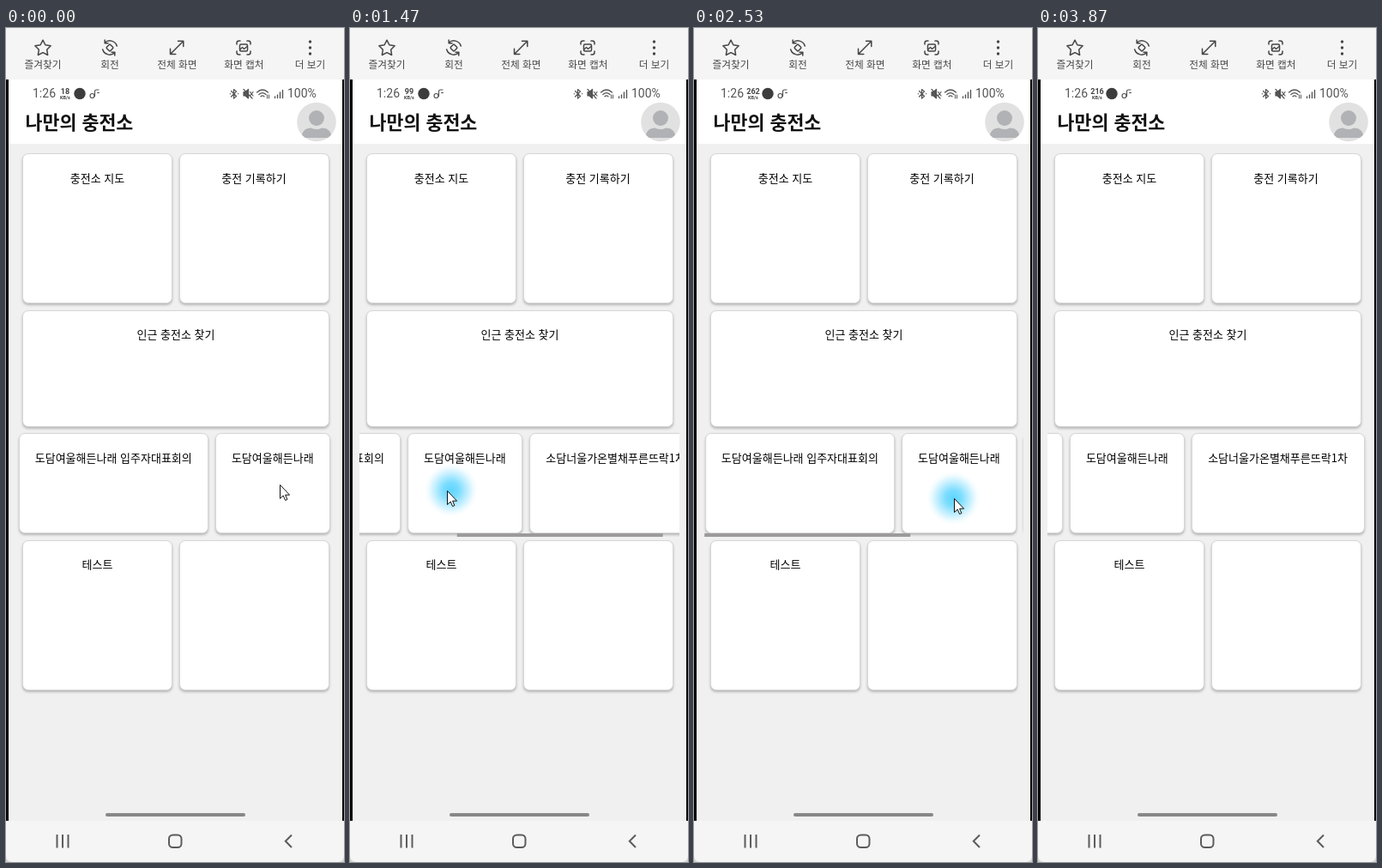
Write an HTML page that moves like this. It is 394 by 972 pixels and loops after 4.27 s.

```html
<!DOCTYPE html>
<html lang="ko">
<head>
<meta charset="utf-8">
<title>나만의 충전소</title>
<style>
html, body { margin: 0; width: 100%; height: 100%; overflow: hidden; background: #d4d4d4; }
#stage { position: relative; width: 394px; height: 972px; overflow: hidden;
  font-family: "Noto Sans CJK KR", "Noto Sans CJK", "Noto Sans", sans-serif; }
#stage > *, .card, .card span { position: absolute; }
.tools { left: 0; top: 0; width: 394px; height: 60px; background: #f5f5f5; }
.phone { left: 0; top: 60px; width: 394px; height: 864px; background: #000; }
.head { left: 3px; top: 60px; width: 389px; height: 75px; background: #fff; }
.body { left: 3px; top: 135px; width: 389px; height: 789px; background: #f0f0f0; }
.nav { left: 0; top: 924px; width: 394px; height: 48px; background: #f5f5f5; border-radius: 0 0 7px 7px; }
.card { box-sizing: border-box; background: #fff; border: 1px solid #d6d6d6; border-radius: 7px;
  box-shadow: 0 2px 3px rgba(0,0,0,.24); }
.card span { left: 0; right: 0; top: 17.5px; text-align: center; white-space: nowrap;
  font-size: 13px; line-height: 20px; font-weight: 500; color: #000; }
#row { left: 11px; top: 470px; width: 373px; height: 123px; overflow: hidden; }
#strip { position: absolute; left: -11px; top: -470px; width: 600px; height: 600px; }
#bar { position: absolute; left: 0; top: 118.5px; width: 240px; height: 4px; background: #9c9a9a; }
#glow { left: -31px; top: -31px; width: 62px; height: 62px;
  background: radial-gradient(circle closest-side, rgba(78,208,255,.9), rgba(90,212,255,.8) 30%,
    rgba(110,217,255,.42) 62%, rgba(130,222,255,.1) 86%, rgba(130,222,255,0)); }
svg { left: 0; top: 0; overflow: visible; }
.ui { fill: none; stroke: #444; stroke-width: 1.5; stroke-linecap: round; stroke-linejoin: round; }
.st { fill: none; stroke: #555; stroke-width: 1.2; stroke-linecap: round; stroke-linejoin: round; }
.rb { font-family: Roboto, sans-serif; }
</style>
</head>
<body>
<div id="stage">
  <div class="tools"></div>
  <div class="phone"></div>
  <div class="head"></div>
  <div class="body"></div>
  <div class="nav"></div>

  <svg width="394" height="972">
    <g class="ui">
      <path id="star"/>
      <path d="M115 17.5A8.5 8.5 0 0 1 129.3 21M127 28.5A8.5 8.5 0 0 1 112.7 25M115.2 14V17.7H119M126.8 32V28.3H123"/>
      <rect x="118" y="20" width="6" height="6" rx="1" transform="rotate(45 121 23)"/>
      <path d="M192 30L206.500 15.500M200.500 15.200H206.800V21.500M191.500 24.200V30.500H197.800"/>
      <path d="M269 19V17.500Q269 15 271.500 15H273M281 15H282.500Q285 15 285 17.500V19M285 27V28.500Q285 31 282.500 31H281M273 31H271.500Q269 31 269 28.500V27"/>
      <rect x="272.500" y="19" width="9" height="8" rx="1.500"/>
      <path d="M273 25L275.500 22.500L277.500 24.500L281 21.500" stroke-width="1.200"/>
    </g>
    <g fill="#444">
      <circle cx="354.500" cy="16" r="1.700"/><circle cx="354.500" cy="23" r="1.700"/><circle cx="354.500" cy="30" r="1.700"/>
    </g>
    <g font-size="11.700" fill="#484848" text-anchor="middle">
      <text x="43" y="47">즐겨찾기</text><text x="121" y="47">회전</text><text x="199.500" y="47">전체 화면</text>
      <text x="277.500" y="47">화면 캡처</text><text x="354.500" y="47">더 보기</text>
    </g>

    <g class="rb" fill="#555">
      <text x="31" y="81" font-size="14">1:26</text>
      <text x="328" y="81" font-size="14">100%</text>
      <g font-weight="700" text-anchor="middle" fill="#444">
        <text id="rate" x="69" y="77" font-size="9">18</text>
        <text x="69" y="83" font-size="5.500">KB/s</text>
      </g>
    </g>
    <circle cx="86" cy="76.500" r="6.700" fill="#3c3c3c"/>
    <g class="st">
      <path d="M103.500 79.500V74Q103.500 72 105.500 72H108M106.500 75.500H108.500"/>
      <circle cx="100.500" cy="79" r="2.500"/>
      <path d="M262.500 73.500L268.500 79.500L265.500 82V71.500L268.500 74L262.500 80"/>
      <path d="M270.500 76.700H270.600M261.300 76.700H261.400"/>
      <path d="M277 74.500H279L282.500 71.500V82L279 79H277Z" fill="#555"/>
      <path d="M284.500 74.500L288 79M288 74.500L284.500 79M277 71.500L287 82"/>
      <path d="M292.500 75Q299 69 305.500 75M294.800 77.500Q299 73.800 303 77.500M297 79.800Q299 78 301 79.800"/>
      <path d="M304.500 78V82M306.500 78V82" stroke-width="1"/>
      <path d="M313.500 80V81.500M316.500 78V81.500M319.500 75V81.500M322.500 72.500V81.500" stroke-width="1.400"/>
    </g>

    <text x="22.500" y="117.500" font-size="21.700" font-weight="700" fill="#111">나만의 충전소</text>
    <clipPath id="face"><circle cx="362" cy="109.500" r="22.800"/></clipPath>
    <circle cx="362" cy="109.500" r="22.800" fill="#e1e1e1"/>
    <g fill="#b0b2b5" clip-path="url(#face)">
      <circle cx="362" cy="105" r="9"/>
      <path d="M344.500 128Q345 116.500 356 116.500Q362 119.500 368 116.500Q379 116.500 379.500 128Z"/>
    </g>

    <rect x="116" y="915" width="163" height="4" rx="2" fill="#878787"/>
    <g fill="none" stroke="#5c5c5c" stroke-width="2">
      <path d="M59.500 940V955.500M66 940V955.500M72.500 940V955.500"/>
      <rect x="190" y="940.500" width="14.500" height="14.500" rx="4.500"/>
      <path d="M333 940.500L325.800 947.800L333 955"/>
    </g>
  </svg>

  <div id="row"><div id="strip"></div><div id="bar"></div></div>
  <div id="glow"></div>
  <svg id="cursor" width="14" height="21">
    <path d="M.5 .5V16.500L4.200 13L6.600 18.500L8.900 17.500L6.600 12.200H11.600Z" fill="#fff" stroke="#111" stroke-width="1"/>
  </svg>
</div>

<script>
const $ = id => document.getElementById(id);
const stage = $('stage'), strip = $('strip'), row = $('row');

function card(x, y, w, h, label, parent) {
  const el = document.createElement('div');
  el.className = 'card';
  el.style.cssText = `left:${x}px;top:${y}px;width:${w}px;height:${h}px`;
  const text = document.createElement('span');
  text.textContent = label;
  el.append(text);
  parent ? parent.append(el) : stage.insertBefore(el, row);
  return el;
}

card(19, 146, 175, 175, '충전소 지도');
card(201.5, 146, 175, 175, '충전 기록하기');
card(19, 328.5, 358, 136, '인근 충전소 찾기');
card(19, 596.5, 175, 175, '테스트');
card(201.5, 596.5, 175, 175, '');
card(14.5, 472, 221.5, 117, '도담여울해든나래 입주자대표회의', strip);
const pressed = card(243.5, 472, 134.5, 117, '도담여울해든나래', strip);
card(385.5, 472, 202, 117, '소담너울가온별채푸른뜨락1차', strip);

$('star').setAttribute('d', 'M' + Array.from({ length: 10 }, (_, i) => {
  const r = i % 2 ? 4.9 : 9.6, a = (i * 36 - 90) * Math.PI / 180;
  return (43 + r * Math.cos(a)).toFixed(2) + ' ' + (23.7 + r * Math.sin(a)).toFixed(2);
}).join('L') + 'Z');

// Pointer path: time, x, y
const path = [
  [0, 319, 532], [70, 319, 533], [130, 319, 535], [200, 319, 535], [270, 319, 537], [330, 318, 539],
  [400, 318, 539], [600, 306, 537], [870, 277, 534], [1000, 229, 534], [1120, 188, 535], [1170, 175, 535],
  [1200, 168, 535], [1270, 152, 536], [1400, 124, 538], [1530, 104, 540], [1650, 96, 541], [1800, 96, 541],
  [1930, 108, 542], [2070, 145, 544], [2120, 175.5, 545], [2170, 230, 546], [2200, 250, 546],
  [2270, 279, 547], [2400, 300, 548], [2530, 303, 548], [2600, 303, 548], [2670, 277, 548],
  [2730, 235, 547], [2790, 198.5, 547], [2840, 188, 547], [2870, 183, 547], [3000, 148, 544],
  [3200, 112, 536], [3400, 97, 524], [3470, 96, 521], [3530, 98, 560], [3600, 108, 760], [3670, 120, 955]
];
const rates = [[3400, 216], [2400, 262], [1400, 99], [470, 23], [0, 18]];
const LOOP = 4270, LIMIT = 207, VIEW = 373, LIFT = 3470;

function pointer(t) {
  const i = path.findIndex(p => p[0] >= t);
  if (i < 0) return path[path.length - 1].slice(1);
  if (i === 0) return path[0].slice(1);
  const a = path[i - 1], b = path[i], k = (t - a[0]) / (b[0] - a[0]);
  return [a[1] + (b[1] - a[1]) * k, a[2] + (b[2] - a[2]) * k];
}

const clamp = (v, lo, hi) => Math.max(lo, Math.min(hi, v));
const tick = k => Math.round(k * 20 / 3) * 10;
const move = (el, x, y) => { el.style.transform = `translate(${x}px,${y}px)`; };

function snap(t) {
  let k = Math.ceil(t * 3 / 200);
  while (tick(k) > t) k--;
  return Math.min(tick(k), 3870);
}

function draw(t) {
  const [cx, cy] = pointer(t).map(Math.round);
  move($('cursor'), cx, cy);
  $('cursor').style.visibility = t < 3730 ? 'visible' : 'hidden';

  const touching = t >= 930 && t < 3730;
  move($('glow'), ...pointer(Math.min(t - 30, LIFT)));
  $('glow').style.visibility = touching ? 'visible' : 'hidden';

  // The list trails the finger slightly
  const scroll = t < 930 ? 0 : clamp(303 - pointer(Math.min(t - 80, LIFT))[0], 0, LIMIT);
  move(strip, -scroll, 0);
  move($('bar'), scroll * VIEW / (VIEW + LIMIT), 0);
  $('bar').style.opacity = t < 930 ? 0 : clamp(1 - (t - 3670) / 200, 0, 1);

  const press = clamp(Math.min((t - 930) / 140, (1400 - t) / 140), 0, 1);
  const tone = Math.round(255 - 30 * press);
  pressed.style.transform = `scale(${1 - .036 * press})`;
  pressed.style.background = `rgb(${tone},${tone},${tone})`;

  $('rate').textContent = rates.find(r => t >= r[0])[1];
}

const start = performance.now();
function frame() {
  draw(snap((performance.now() - start) % LOOP));
  requestAnimationFrame(frame);
}
frame();
</script>
</body>
</html>
```
